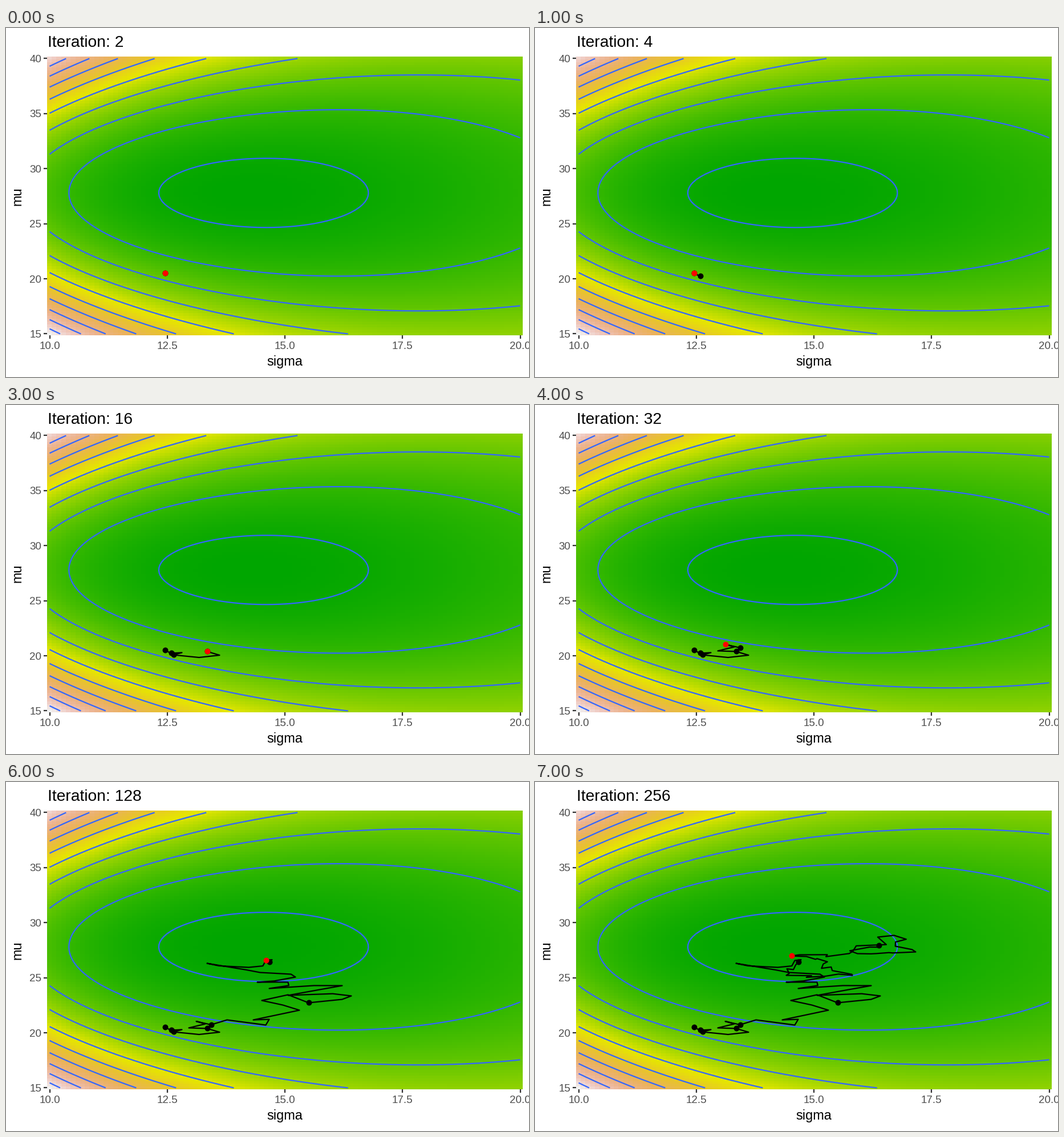
Animation, 917 px wide and 611 px high, one loop 8000 ms. Source, as a matplotlib script:

```python
import numpy as np
import matplotlib.pyplot as plt
from matplotlib.animation import FuncAnimation
from matplotlib.colors import LinearSegmentedColormap

W, H, DPI = 917, 611, 100
PT = 72 / DPI            # points per pixel
LINE = 2.25 * PT
plt.rcParams["font.family"] = "Liberation Sans"


def px(sigma):
    return 76 + (sigma - 10) * 82.5


def py(mu):
    return 535 - (mu - 15) * 19.28


def loss(sigma, mu):
    """Mean negative log-likelihood of a normal sample."""
    return np.log(sigma) + (203.4 + (mu - 27.8) ** 2) / (2 * sigma ** 2)


def pixel_loss(p):
    return loss(10 + (p[0] - 76) / 82.5, 15 + (535 - p[1]) / 19.28)


# Per doubling of the iteration count: random steps between key points,
# then the key points in pixels; the last one is where the walker stands.
STAGES = [
    (0, [(278, 429)]),
    (0, [(289, 434)]),
    (0, [(308, 433), (293, 437)]),
    (0, [(338, 441.5), (374, 437.5), (352, 431)]),
    (0, [(320, 430), (349, 423), (333, 418.5), (359, 424.5)]),
    (0, [(387, 416), (455, 425), (461, 415), (433, 416), (514, 399),
         (485, 390), (448, 382), (494, 372), (530, 386)]),
    (1, [(605, 374), (494, 373), (589, 356), (461, 361), (494, 350),
         (440, 350), (507, 341), (445, 333), (352, 317), (425, 324),
         (455, 312), (461, 315)]),
    (4, [(440, 338), (556, 338), (505, 318), (449, 304), (550, 300),
         (629, 268), (667, 297), (565, 300), (602, 286)]),
]


def make_legs(seed=4):
    """Join the key points, wandering mostly sideways between them."""
    rng = np.random.default_rng(seed)
    legs, here = [], STAGES[0][1][0]
    for loose, keys in STAGES:
        leg = []
        for key in keys:
            for t in np.arange(1, loose + 1) / (loose + 1):
                mid = np.add(here, t * np.subtract(key, here))
                leg.append(tuple(mid + rng.uniform(-1, 1, 2) * (24, 4)))
            leg.append(key)
            here = key
        legs.append(leg)
    return legs


LEGS = make_legs()

fig = plt.figure(figsize=((W + 1e-6) / DPI, (H + 1e-6) / DPI), dpi=DPI,
                 facecolor="white")
ax = fig.add_axes([0, 0, 1, 1])
ax.axis("off")

# Loss surface on a grid of tiles
sigma = np.linspace(10, 20, 101)
mu = np.linspace(15, 40, 101)
z = loss(sigma[None, :], mu[:, None])
terrain = LinearSegmentedColormap.from_list("land", [
    "#00A600", "#2DB600", "#63C600", "#A0D600", "#E6E600",
    "#E8C32E", "#EBB25E", "#EDB48E", "#F0C9C0", "#F2F2F2"], N=512)
ax.imshow(z, cmap=terrain, origin="lower", interpolation="nearest",
          aspect="auto", extent=(71.5, 904.5, 537.5, 50.5))
ax.contour(px(sigma), py(mu), z, levels=3.1813 + 0.1 * np.arange(10),
           colors="#3366FF", linewidths=LINE, linestyles="solid")
# Whole numbers fall on pixel centres
ax.set_xlim(-0.5, W - 0.5)
ax.set_ylim(H - 0.5, -0.5)


def label(x, y, text, size, color="black", **kw):
    return ax.text(x, y, text, fontsize=size * PT, color=color,
                   **{"ha": "center", "va": "baseline", **kw})


def tick(xs, ys):
    ax.plot(xs, ys, color="#333333", lw=LINE, solid_capstyle="butt")


for s in np.linspace(10, 20, 5):
    tick([px(s)] * 2, [537.5, 543.5])
    label(px(s), 561.5, f"{s:.1f}", 18.8, "#4D4D4D")
for m in range(15, 41, 5):
    tick([65.5, 71.5], [py(m)] * 2)
    label(61.5, py(m) + 6.5, str(m), 18.8, "#4D4D4D", ha="right")
label(488.5, 590, "sigma", 23.5)
label(25.5, 294, "mu", 23.5, rotation=90, rotation_mode="anchor")
title = label(72, 32.5, "", 28.3, ha="left")

walk, = ax.plot([], [], color="black", lw=LINE, solid_joinstyle="round",
                solid_capstyle="butt", zorder=4)
dot = dict(ls="", marker="o", ms=10 * PT, mew=0)
marks, = ax.plot([], [], color="black", zorder=5, **dot)
best, = ax.plot([], [], color="red", zorder=6, **dot)


def draw(i):
    keys = [key for _, stage in STAGES[:i + 1] for key in stage]
    title.set_text(f"Iteration: {2 ** (i + 1)}")
    walk.set_data(*zip(*sum(LEGS[:i + 1], [])))
    marks.set_data(*zip(*(leg[-1] for leg in LEGS[:i + 1])))
    best.set_data(*zip(min(keys, key=pixel_loss)))
    return title, walk, marks, best


anim = FuncAnimation(fig, draw, frames=len(STAGES), interval=1000,
                     repeat=True, repeat_delay=0)
plt.show()
```
